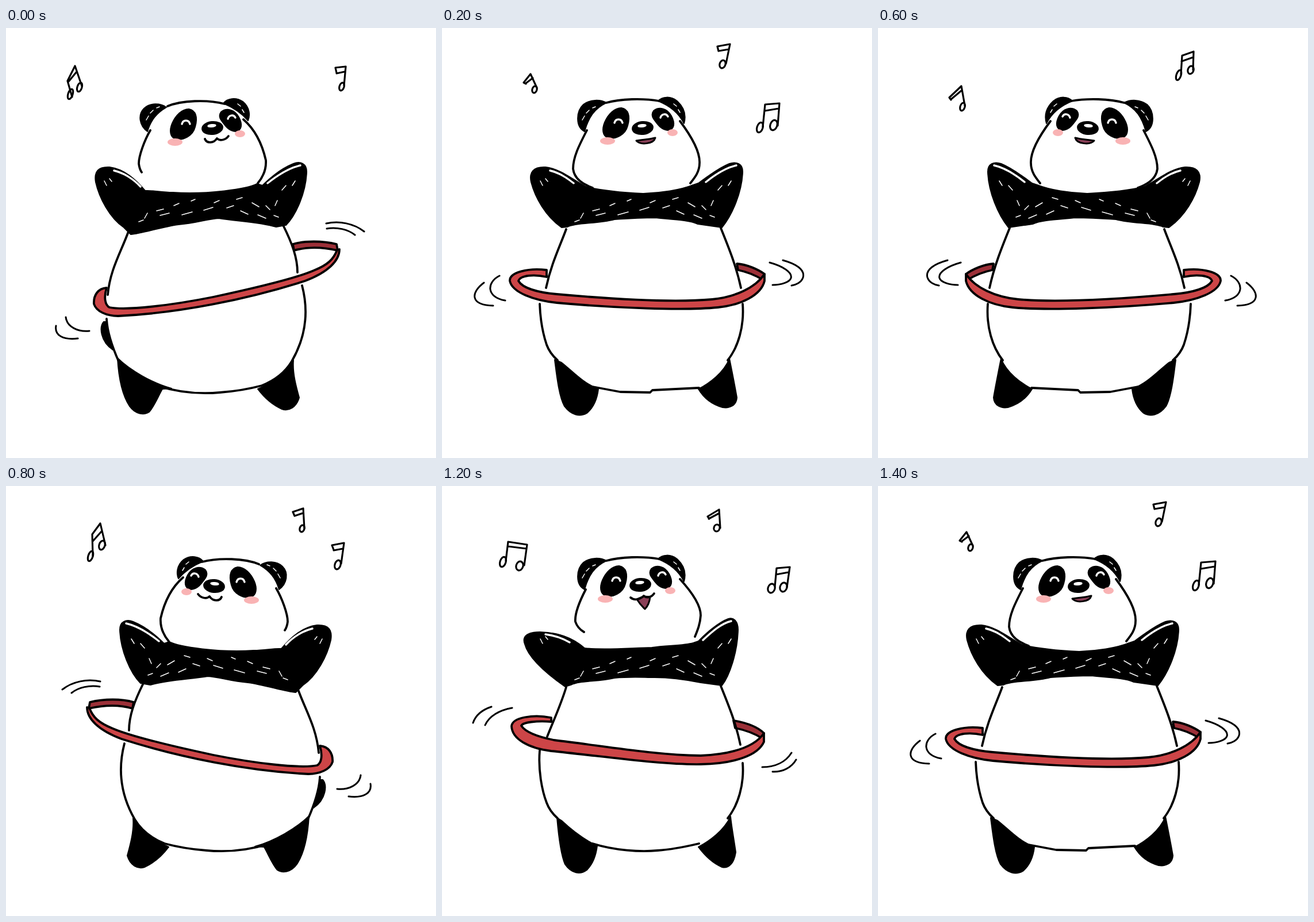
An HTML page for the animation above (1600 ms loop, 748 by 748 pixels).

```html
<!DOCTYPE html>
<html lang="en">
<head>
<meta charset="utf-8">
<title>Hula hoop panda</title>
<style>
html, body { margin: 0; width: 100%; height: 100%; overflow: hidden; background: #fff; }
svg { display: block; width: 100vw; height: 100vh; fill: none; stroke: #000; stroke-width: 3.8; stroke-linecap: round; stroke-linejoin: round; }
.ink { fill: #000; stroke-width: 2; }
.front { fill: #cd4547; }
.back { fill: #9c3038; }
.tongue { fill: #8b4058; stroke-width: 3; }
.cheek { fill: #f9b3b4; stroke: none; }
.white { stroke: #fff; stroke-width: 3.4; }
.scratch { stroke: #fff; stroke-width: 1.5; }
.note { stroke-width: 3.2; }
.swish { stroke-width: 3; }
</style>
</head>
<body>
<svg id="stage" viewBox="0 0 748 748"></svg>
<script>
const path = (d, cls = '') => `<path class="${cls}" d="${d}"/>`;
const oval = (x, y, rx, ry, turn = 0, cls = '') =>
  `<ellipse class="${cls}" cx="${x}" cy="${y}" rx="${rx}" ry="${ry}" transform="rotate(${turn} ${x} ${y})"/>`;
const note = (d, ...heads) =>
  `<g class="note">${path(d)}${heads.map(h => oval(...h, 18)).join('')}</g>`;

// Dry-brush gaps in the black areas
const scratches = path(`M262 318l12-3M268 326l16-4M292 309l9-4M306 325l18-5M322 301l7-3M344 317l16-5
  M362 304l9-4M384 313l12-4M401 298l10-3M408 318l13 6M428 304l12 7M438 325l14 6M452 309l7 7M466 326l8 3
  M246 322l-5 9M231 337l8-3M480 282l7-8M472 300l-4 9M171 266l4 8M180 262l4 5M498 274l5-8`, 'scratch');
const earMarks = path('M244 160l4-7M251 148l5-5M262 139l5-2M403 132l5 4M411 142l3 5', 'scratch');

const tall = {
  x: 0, y: 0, nose: [359, 174],
  ears: `M246 180C232 170 229 151 240 140C250 130 268 130 279 138C262 148 252 160 246 180Z
    M378 131C385 122 400 120 412 128C424 138 425 152 421 161C410 148 395 138 378 131Z`,
  head: `M281 136C305 126 350 124 380 132M251 178C241 195 231 222 231 236C232 244 234 248 236 251
    M413 159C437 180 447 208 452 230C453 245 448 258 438 270`,
  mouth: path('M346 193C349 201 361 201 367 192C372 197 382 195 387 188'),
  arms: `M242 283C225 263 205 245 180 242C160 241 153 250 156 268C162 295 180 330 205 347L217 359
    C235 358 270 346 300 342C330 340 350 332 370 331C400 336 440 337 470 346L487 343
    C505 325 522 285 523 250C523 236 512 231 500 236C480 244 460 260 446 274L437 271C420 280 350 290 290 286C270 286 255 282 242 283Z`,
  shine: 'M188 248C205 252 222 263 234 276M455 270C475 254 494 243 512 239',
  body: `M213 354C200 390 181 420 177 464M175 506C176 530 185 555 196 580
    M262 622C300 634 340 637 372 634C400 632 430 626 445 622M482 343C498 375 507 400 507 425
    M515 448C526 490 523 535 497 580C485 600 465 614 445 622`,
  feet: `M194 574C196 610 203 640 215 658C225 672 240 674 249 668C258 658 265 640 272 628L288 627C255 618 215 595 194 574Z
    M500 578C498 600 505 625 510 643C505 660 492 667 480 663C462 655 447 640 438 628C462 618 485 600 500 578Z
    M170 511C162 520 164 545 186 560C182 540 176 525 174 511Z`,
  back: 'M499 376C520 370 550 370 575 376L577 387C550 381 525 380 501 387Z',
  hoop: `M175 452C160 453 152 465 153 480C157 493 175 501 195 501C300 496 420 472 520 440C560 425 580 405 580 385
    L576 386C570 402 560 412 535 422C500 437 430 453 360 468C290 482 210 492 180 486C172 482 170 468 175 452Z`,
  swish: `M557 340C580 335 605 340 623 354M558 349C575 346 595 350 607 360
    M104 503C106 520 125 529 145 527M87 518C84 535 100 543 125 540`
};

const mid = {
  x: -6, y: -2, nose: [349, 174],
  ears: `M248 180C232 172 233 145 246 133C258 124 275 124 286 130C265 140 255 155 248 180Z
    M376 127C383 119 398 118 409 127C421 138 425 152 421 166C412 148 396 135 376 127Z`,
  head: `M286 130C310 123 350 122 378 127M252 178C238 205 228 225 228 245C230 262 245 272 262 278
    M414 162C435 190 449 215 448 235C448 250 440 260 432 270`,
  mouth: path('M338 196C348 194 360 194 371 191C368 202 345 204 338 196Z', 'tongue'),
  arms: `M250 276C225 262 205 245 180 242C160 241 151 250 155 268C162 295 180 327 208 347L218 346
    C235 338 270 341 300 333C330 331 345 330 370 330C400 333 430 334 445 341L487 347
    C505 325 522 285 523 250C523 236 512 232 500 236C480 244 460 260 446 270L437 273C415 282 380 287 350 288C310 286 275 282 250 276Z`,
  shine: 'M188 248C205 252 218 261 229 270M459 268C475 255 494 243 512 239',
  body: `M216 350C205 380 190 410 181 452M170 480C171 510 175 530 182 551C186 562 192 570 201 578
    M262 624L310 633L362 634L366 630L447 626M485 348C500 385 512 415 520 452M523 480C526 520 515 555 497 578`,
  feet: `M196 577C199 600 203 640 213 658C225 674 240 677 252 670C264 660 270 645 272 628C245 618 225 595 208 582Z
    M500 575C504 595 510 625 513 643C512 657 500 662 488 660C470 655 455 643 446 628C465 618 490 600 500 575Z`,
  back: 'M513 410C530 411 550 420 561 428L558 438C545 430 530 424 515 421Z',
  hoop: `M182 421C150 417 117 425 118 440C122 460 160 474 200 478C300 487 420 492 480 486C520 482 555 465 561 440
    L561 428C545 452 510 468 470 472C400 478 300 472 200 463C165 460 140 452 133 440C136 430 160 428 182 433Z`,
  swish: `M100 431C78 442 76 468 110 474M73 443C50 460 48 482 89 483
    M570 408C592 414 610 425 607 435C605 442 590 447 575 447M593 404C615 410 632 420 628 434C625 443 615 447 608 448`
};

const low = {
  ...mid, x: -10, y: -2, nose: [345, 172],
  ears: mid.ears,
  head: `M286 130C310 123 350 122 378 127M250 180C237 205 231 225 232 236C235 245 240 250 247 254
    M414 162C435 185 450 208 450 225C449 240 445 250 440 262`,
  mouth: path('M339 197C345 207 350 211 353 214C358 209 361 202 362 193L351 192Z', 'tongue') +
    path('M328 194C335 200 345 197 351 191C356 196 365 193 369 187'),
  arms: `M248 282C225 262 200 255 170 254C148 254 139 262 144 275C150 298 180 325 214 349L224 346
    C240 338 270 341 300 334C330 331 350 333 370 333C400 333 430 338 450 342L487 347
    C500 330 514 290 515 250C515 236 508 228 498 231C482 237 460 255 446 270L437 273C420 278 390 277 365 281C325 282 280 286 248 282Z`,
  shine: 'M180 258C196 260 210 265 222 272M454 268C470 253 486 239 503 235',
  body: `M216 350C207 380 194 408 183 436M170 460C167 495 174 530 182 551C186 562 192 570 201 578
    M262 622C300 634 345 637 375 634C405 632 430 626 447 622M485 348C500 385 512 415 519 450M523 482C526 520 515 555 497 578`,
  feet: `M200 577C202 600 206 640 214 658C225 674 240 677 252 668C262 658 268 642 270 626C245 614 225 598 208 582Z
    M502 575C504 595 508 615 511 637C508 657 498 666 487 663C468 655 455 640 446 628C465 618 490 600 502 575Z`,
  back: 'M507 408C530 412 550 420 560 430L557 439C540 428 525 424 510 421Z',
  hoop: `M190 403C160 397 122 402 121 418C122 440 150 456 190 461C280 470 380 485 450 484C510 483 550 468 560 445
    L560 430C545 452 510 466 450 469C370 468 280 452 195 442C165 436 145 428 138 417C140 411 165 408 190 410Z`,
  swish: `M86 384C68 390 58 400 54 412M122 386C100 390 82 400 75 416
    M557 489C580 489 598 480 608 464M575 497C592 498 608 490 616 476`
};

function panda(p) {
  const [nx, ny] = p.nose;
  const face = path(`M318 141C330 143 334 155 329 172C325 188 308 196 295 193C285 190 284 178 289 166C295 152 306 141 318 141Z
      M374 146C384 138 398 142 405 155C412 168 410 178 400 180C388 180 381 170 374 160C371 155 371 150 374 146Z`, 'ink') +
    path('M306 167C308 159 318 159 320 167M386 158C388 151 396 150 399 156', 'white') +
    oval(294, 198.5, 13, 6.5, 0, 'cheek') + oval(407, 184, 9, 6, 0, 'cheek');
  return path(p.back, 'back') + path(p.swish, 'swish') + path(p.body) + path(p.feet, 'ink') +
    path(p.head) + path(p.ears, 'ink') + earMarks +
    path(p.arms, 'ink') + path(p.shine, 'white') + scratches +
    `<g transform="translate(${p.x} ${p.y})">${face}</g>` +
    oval(nx, ny, 18, 11, -6, 'ink') + oval(nx - 1, ny - 4, 6, 1.2, -6, 'white') +
    p.mouth + path(p.hoop, 'front');
}
const flip = (p, width) => `<g transform="matrix(-1 0 0 1 ${width} 0)">${panda(p)}</g>`;

const scenes = [
  panda(tall) +
    note('M115 120L107 92L120 66L132 101M109 93L123 76', [112, 115, 4, 9], [128, 103, 4, 8]) +
    note('M575 78L573 69L591 67L588 100M575 79L589 76', [584, 102, 4, 7]),
  panda(mid) +
    note('M146 97L142 95L154 80L165 104M146 96L158 87', [161, 107, 4, 6]) +
    note('M481 40L479 32L501 28L494 62M481 40L499 37', [488, 63, 5, 7]) +
    note('M558 172L562 133L587 131L584 170M562 144L586 140', [553, 173, 5, 9], [577, 169, 6, 9]),
  panda(low) +
    note('M111 130L115 97L148 102L143 138M115 105L147 109', [106, 132, 5, 9], [135, 139, 6, 8]) +
    note('M465 57L462 53L482 41L484 73M464 57L481 48', [478, 73, 5, 6]) +
    note('M579 175L582 143L605 141L600 176M581 154L603 150', [573, 178, 6, 8], [594, 176, 6, 8]),
  flip(mid, 714) +
    note('M127 125L124 121L145 101L151 135M127 124L145 109', [147, 137, 4, 7]) +
    note('M527 80L529 48L549 41L548 73M528 58L548 51', [523, 82, 4, 9], [544, 73, 5, 7]),
  flip(tall, 721) +
    note('M151 122L150 84L164 65L173 103M151 96L167 78', [147, 122, 4, 9], [167, 103, 5, 8]) +
    note('M502 52L499 45L517 39L519 74M502 52L517 47', [515, 74, 4, 6]) +
    note('M570 111L567 103L588 99L583 135M570 112L586 109', [577, 137, 5, 8])
];

// The dance swings through the five poses and back
const stage = document.getElementById('stage');
let shown = -1;
function draw(now) {
  const step = Math.floor(now / 200) % 8;
  const pose = 4 - Math.abs(4 - step);
  if (pose !== shown) stage.innerHTML = scenes[shown = pose];
  requestAnimationFrame(tick);
}
let start;
function tick(now) {
  start ??= now;
  draw(now - start);
}
draw(0);
</script>
</body>
</html>
```
